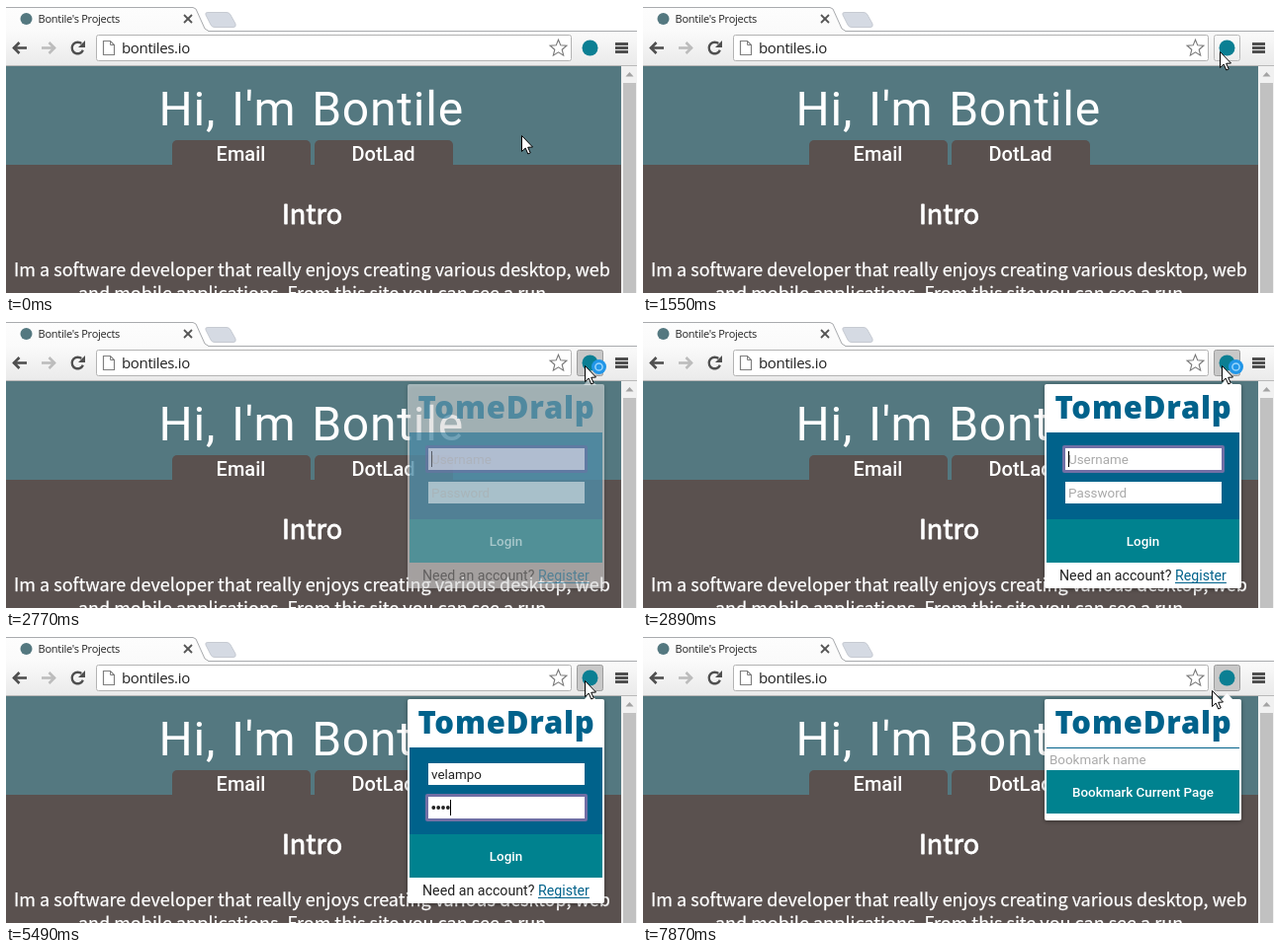
An HTML page with a canvas for the animation above (8000 ms loop, 638 by 291 pixels).

```html
<!DOCTYPE html>
<html lang="en">
<head>
<meta charset="utf-8">
<title>Bookmark popup</title>
<style>
html, body { margin: 0; width: 100%; height: 100%; overflow: hidden; background: #fff; }
canvas { display: block; width: 638px; height: 291px; }
</style>
</head>
<body>
<canvas id="stage" width="638" height="291"></canvas>
<script>
const ctx = document.getElementById('stage').getContext('2d');
const LOOP = 8000;

const UI = '"Open Sans", "Noto Sans", sans-serif';
const PLAY = 'Roboto, sans-serif';
const BODY = '"Noto Sans CJK JP", "Noto Sans CJK SC", "Noto Sans CJK", "Open Sans", sans-serif';

const TEAL = '#547880', BROWN = '#5a514f', BLUE = '#00628b', GREEN = '#00828f';
const GREY = '#4f4f4f', HINT = '#a9a9a9';
const USER = 'velampo';
const DOT_TIMES = [4780, 5090, 5210, 5490, 5770];

function rect(x, y, w, h, fill) {
  ctx.fillStyle = fill;
  ctx.fillRect(x, y, w, h);
}

function box(x, y, w, h, radii, fill, stroke) {
  ctx.beginPath();
  ctx.roundRect(x, y, w, h, radii);
  if (fill) { ctx.fillStyle = fill; ctx.fill(); }
  if (stroke) { ctx.strokeStyle = stroke; ctx.lineWidth = 1; ctx.stroke(); }
}

function poly(points, fill, stroke, width = 1, closed = true) {
  ctx.beginPath();
  points.forEach(([x, y]) => ctx.lineTo(x, y));
  if (closed) ctx.closePath();
  if (fill) { ctx.fillStyle = fill; ctx.fill(); }
  if (stroke) { ctx.strokeStyle = stroke; ctx.lineWidth = width; ctx.stroke(); }
}

function disc(x, y, r, fill) {
  ctx.beginPath();
  ctx.arc(x, y, r, 0, Math.PI * 2);
  ctx.fillStyle = fill;
  ctx.fill();
}

function text(str, x, y, font, fill, { align = 'left', spacing = 0, words = 0, fat = 0 } = {}) {
  ctx.save();
  ctx.font = font;
  ctx.fillStyle = ctx.strokeStyle = fill;
  ctx.textAlign = align;
  ctx.letterSpacing = spacing + 'px';
  ctx.wordSpacing = words + 'px';
  ctx.fillText(str, x, y);
  if (fat) {
    ctx.lineWidth = fat;
    ctx.lineJoin = 'round';
    ctx.strokeText(str, x, y);
  }
  ctx.restore();
}

function widthOf(str, font) {
  ctx.font = font;
  return ctx.measureText(str).width;
}

function vertical(y0, y1, from, to) {
  const g = ctx.createLinearGradient(0, y0, 0, y1);
  g.addColorStop(0, from);
  g.addColorStop(1, to);
  return g;
}

function drawTabs() {
  rect(0, 0, 638, 27, '#fff');
  rect(0, 25, 638, 1, '#a9abae');
  poly([[0, 27], [0, 1], [190, 1], [194, 4], [203, 24], [206, 27]], vertical(0, 27, '#fdfdfd', '#fafafa'));
  poly([[0, 1.5], [189, 1.5], [192, 3], [201, 23], [205, 25.5]], null, '#a9abae', 1, false);

  ctx.beginPath();
  ctx.moveTo(204, 6.5);
  ctx.lineTo(223, 6.5);
  ctx.quadraticCurveTo(226, 6.5, 227, 9);
  ctx.lineTo(232, 18);
  ctx.quadraticCurveTo(233, 21.5, 230, 21.5);
  ctx.lineTo(211, 21.5);
  ctx.quadraticCurveTo(208, 21.5, 207, 19);
  ctx.lineTo(202, 9);
  ctx.quadraticCurveTo(201, 6.5, 204, 6.5);
  ctx.fillStyle = '#d5dae3';
  ctx.fill();
  ctx.strokeStyle = '#c6cad2';
  ctx.lineWidth = 1;
  ctx.stroke();

  disc(20.5, 13, 6, TEAL);
  text("Bontile's Projects", 32.5, 17, '11px ' + UI, '#222', { spacing: -0.25 });
  poly([[180, 9], [188, 17]], null, '#555', 1.8, false);
  poly([[188, 9], [180, 17]], null, '#555', 1.8, false);
}

function drawArrow(x, dir, color) {
  const at = (dx, dy) => [x + dx * dir, 42.5 + dy];
  poly([at(-6.5, 0), at(7, 0)], null, color, 2.6, false);
  poly([at(-0.5, -5.5), at(-6, 0), at(-0.5, 5.5)], null, color, 2.6, false);
}

function drawToolbar() {
  rect(0, 26, 638, 35, vertical(26, 61, '#fafafa', '#eaeaea'));
  rect(0, 60, 638, 1, '#b9b9b9');
  drawArrow(14, 1, GREY);
  drawArrow(43, -1, '#bcbcbc');

  ctx.beginPath();
  ctx.arc(72.5, 42.5, 5.8, 0.4, Math.PI * 1.72);
  ctx.strokeStyle = GREY;
  ctx.lineWidth = 2.4;
  ctx.stroke();
  poly([[80, 35], [80, 42], [73, 42]], GREY);

  box(91.5, 29.5, 480, 26, 2, '#fff', '#b3b3b3');
  poly([[98.5, 35.5], [105.5, 35.5], [109.5, 39.5], [109.5, 49.5], [98.5, 49.5]], '#fff', '#808080', 1.2);
  poly([[105.5, 35.5], [105.5, 39.5], [109.5, 39.5]], null, '#808080', 1, false);
  text('bontiles.io', 117, 48, '15px ' + UI, '#222', { spacing: -0.35 });

  const star = Array.from({ length: 10 }, (_, i) => {
    const r = i % 2 ? 3.9 : 8.8, a = -Math.PI / 2 + i * Math.PI / 5;
    return [558.5 + r * Math.cos(a), 43 + r * Math.sin(a)];
  });
  poly(star, '#fff', '#777', 1.1);
  for (let i = 0; i < 3; i++) rect(616, 37 + i * 4, 13, 3, GREY);
}

function drawExtension(t) {
  if (t >= 2100) box(577.5, 29.5, 26, 26, 2, '#c8c8c8', '#9c9c9c');
  else if (t >= 1411) box(577.5, 29.5, 26, 26, 2, vertical(29, 56, '#fbfbfb', '#ededed'), '#b9b9b9');
  disc(590.5, 42.5, 8, '#0b7f93');
}

function drawPage() {
  rect(0, 61, 622, 100, TEAL);
  rect(0, 161, 622, 130, BROWN);
  text("Hi, I'm Bontile", 154.5, 121, '48px ' + PLAY, '#fff', { spacing: 0.8, words: 3 });
  box(168, 136, 140, 26, [5, 5, 0, 0], BROWN);
  box(312, 136, 140, 26, [5, 5, 0, 0], BROWN);
  const tab = '500 20px ' + PLAY;
  text('Email', 237.5, 157, tab, '#fff', { align: 'center' });
  text('DotLad', 381.5, 157, tab, '#fff', { align: 'center' });

  text('Intro', 309.5, 221, '27px ' + BODY, '#fff', { align: 'center', fat: 0.9 });
  const body = '18px ' + BODY;
  const style = { align: 'center', fat: 0.25 };
  text('Im a software developer that really enjoys creating various desktop, web', 309.5, 274, body, '#fff', style);
  text('and mobile applications. From this site you can see a run', 309.5, 298, body, '#fff', style);

  rect(622, 61, 16, 230, '#f1f1f1');
  rect(624, 78, 13, 213, '#c1c1c1');
  poly([[626.5, 71.5], [630.5, 67], [634.5, 71.5]], '#a3a3a3');
}

function drawFrame(height) {
  ctx.save();
  ctx.shadowColor = 'rgba(0,0,0,.4)';
  ctx.shadowBlur = 4;
  ctx.shadowOffsetY = 1;
  box(406, 64, 199, height, 2, '#fff');
  ctx.restore();
  poly([[584, 65], [590.5, 58], [597, 65]], '#fff');
  text('TomeDralp', 506, 99, '800 31px ' + UI, BLUE, { align: 'center', spacing: 0.8 });
}

function drawField(y, focused) {
  if (focused) box(424, y - 3, 164, 28, 2, '#716fa5');
  rect(427, y, 158, 22, '#fff');
}

function caret(x, y) {
  rect(Math.round(x), y, 1, 16, '#000');
}

function drawLogin(t) {
  const font = '13.4px ' + PLAY;
  const onPassword = t >= 4320;
  const typed = USER.slice(0, Math.max(0, Math.floor((t - 3170) / 143 + 0.01)));
  const dots = t < 6720 ? DOT_TIMES.filter(at => t >= at).length : 0;

  drawFrame(207);
  rect(408, 113, 195, 88, BLUE);
  rect(408, 201, 195, 44, GREEN);
  drawField(129, !onPassword);
  drawField(163, onPassword);

  text(typed || 'Username', 430, 145, font, typed ? '#222' : HINT);
  if (!onPassword) caret(430 + widthOf(typed, font), 132);

  if (!dots) text('Password', 430, 179, font, HINT);
  for (let i = 0; i < dots; i++) disc(432.3 + i * 4.85, 174, 1.9, '#222');
  const blinkOff = t >= 6290 && t < 6850;
  if (onPassword && !blinkOff) caret(430 + dots * 4.85, 166);

  text('Login', 505.5, 228, '500 ' + font, '#fff', { align: 'center' });
  const foot = '14.2px ' + PLAY;
  const question = 'Need an account? ';
  text(question, 421, 263, foot, '#222');
  const x = 421 + widthOf(question, foot);
  text('Register', x, 263, foot, BLUE);
  rect(x, 265, widthOf('Register', foot), 1, BLUE);
}

function drawBookmark(t) {
  const font = '13.4px ' + PLAY;
  drawFrame(123);
  rect(408, 113, 195, 1, BLUE);
  rect(408, 136, 195, 44, GREEN);
  text('Bookmark name', 411, 130, font, HINT);
  if (t < 7430) caret(411, 117);
  text('Bookmark Current Page', 505.5, 163, '500 ' + font, '#fff', { align: 'center' });
}

function drawPopup(t) {
  if (t < 2650) return;
  if (t < 2770) {
    rect(406, 57, 34, 33, 'rgba(255,255,255,.06)');
    return;
  }
  ctx.save();
  if (t < 2890) ctx.globalAlpha = 0.5;
  if (t < 7000) drawLogin(t);
  else drawBookmark(t);
  ctx.restore();
}

function pointerAt(t) {
  if (t < 150) return [522, 132];
  if (t < 580) return [521, 131];
  if (t < 1670) {
    const p = Math.min(8, Math.floor((t - 580) / 138.57 + 0.01) + 1) / 8;
    const e = p * p * (3 - 2 * p);
    return [Math.round(521 + 63 * e), Math.round(131 - 84 * e)];
  }
  if (t < 1820) return [585, 47];
  return t < 7870 ? [586, 46] : [576, 56];
}

function drawPointer(t) {
  const [x, y] = pointerAt(t);
  const shape = [[0, 0], [0, 16], [3.7, 12.6], [6.3, 18.5], [8.7, 17.4], [6.2, 11.8], [11, 11.5]];
  poly(shape.map(([dx, dy]) => [x + dx - 0.5, y + dy - 0.5]), '#fff', '#000');
  if (t >= 2100 && t < 3170) {
    disc(599.5, 46.5, 7.5, '#2196e8');
    ctx.beginPath();
    ctx.arc(599.5, 46.5, 3.6, 0, Math.PI * 2);
    ctx.strokeStyle = '#9bd6fb';
    ctx.lineWidth = 1.5;
    ctx.stroke();
  }
}

function draw() {
  const t = performance.now() % LOOP;
  drawTabs();
  drawToolbar();
  drawExtension(t);
  drawPage();
  drawPopup(t);
  drawPointer(t);
  requestAnimationFrame(draw);
}
draw();
</script>
</body>
</html>
```
